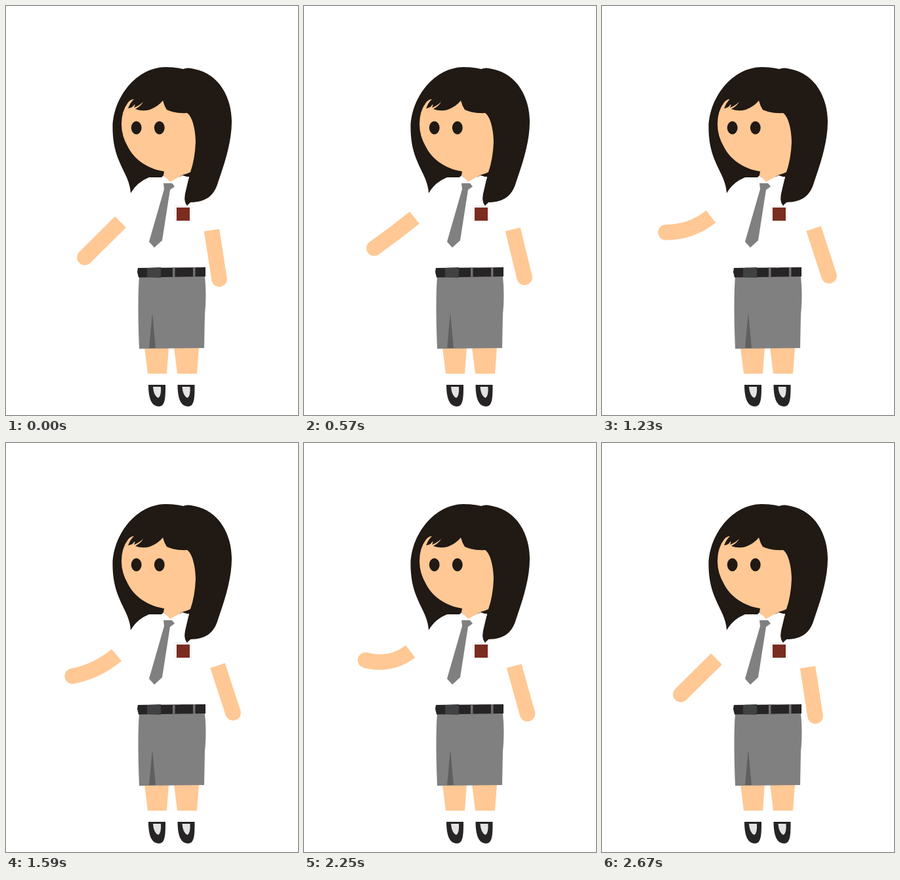
An HTML page that plays this animation: 445 by 623 pixels, repeating every 2.7 s.

```html
<!DOCTYPE html>
<html lang="en">
<head>
<meta charset="utf-8">
<title>Waving student</title>
<style>
  html, body { margin: 0; width: 100%; height: 100%; overflow: hidden; background: #fff; }
  svg { display: block; width: 445px; height: 623px; }
  .hair { fill: #201914; }
  .skin { fill: #ffc894; }
  .grey { fill: #808080; }
  .belt { fill: #272425; }
  .arm { fill: none; stroke: #ffc894; stroke-width: 23.6; }
</style>
</head>
<body>
<svg viewBox="0 0 445 623">
  <!-- head -->
  <path class="hair" d="M190 285C188 253 162 238 162.500 184C164 137 200 93.500 243 93Q259 93 270 96Q277 93 287 96C325 103 344 140 344 176C344 210 331 245 323 269C317 290 303 299 281 299L276 304Q271 297 273 286L279 260L237 261L218 261Q200 268 190 285Z"/>
  <path class="skin" d="M176 180Q176 160 186 147Q190 142 195 142Q190 146 186 156Q193 155 195 151Q198 148 195 155Q203 152 209 146Q206 152 197 157Q208 161 219 158Q232 153 239 144Q241 152 245 158Q258 164 276 163C285 169 289 192 289 207Q288 233 281 253Q275 256 270 257L250 268L240 258L241 252C215 248 195 233 186 215Q176 198 176 180Z"/>
  <g class="hair">
    <ellipse cx="198.700" cy="185.500" rx="7.900" ry="10"/>
    <ellipse cx="233.800" cy="185.500" rx="7.900" ry="10"/>
  </g>

  <!-- shirt front -->
  <path fill="#fff" d="M237 261L240 258L250 268L269 258L279 261L273 280L256 276L250 269L240 272Z"/>
  <path class="grey" d="M240 270L253 270L257 275L250 280L238 357L226 368L218 359L241 279Z"/>
  <path fill="#f7f7f9" d="M256 303H272L276 304L279 300L283 306V329H257Z"/>
  <rect x="260" y="307" width="20" height="20" fill="#7b2c20"/>
  <path class="hair" d="M273 290L281 299L276 304Q271 298 273 290Z"/>

  <!-- skirt and belt -->
  <path class="skin" d="M211 520H248L245 560H216ZM256 520H294L291 560H261Z"/>
  <path class="grey" d="M203 412H303Q306 440 303 470L302 521L203 522Q200 450 203 412Z"/>
  <path fill="#5f5f5f" d="M223 467L228 521H218Z"/>
  <path class="belt" d="M201 399L304 398V412L202 413.500L200 405Z"/>
  <path fill="#404142" d="M215 399L236 398V414L215 413Z"/>
  <path fill="#707070" d="M254 398H257.500V414H254ZM285 398H288.500V413H285Z"/>

  <!-- shoes -->
  <g id="shoe">
    <path class="belt" d="M217 577H243C243 595 243 610 233 610C221 610 217 596 217 577Z"/>
    <path fill="#e3e3e3" d="M224 580H236Q237 594 232 597Q225 594 224 580Z"/>
  </g>
  <use href="#shoe" x="44.500"/>

  <path class="arm" id="leftArm"/>
  <circle class="skin" id="leftHand" r="11.800"/>
  <path class="arm" id="rightArm"/>
  <circle class="skin" id="rightHand" r="11.800"/>
</svg>
<script>
  const LOOP = 2700, STEP = 30;
  const BEGIN = 270, END = 2670, RAISE = 570;   // when the arms leave and reach rest
  const DIP = 0.72;                             // how far the wave drops in between
  const TURN = 70 * Math.PI / 180;              // forearm turn when fully bent

  const el = id => document.getElementById(id);
  const clamp = v => Math.max(0, Math.min(1, v));
  const mix = (a, b, p) => a.map((v, i) => v + (b[i] - v) * p);

  function drawArm(side, sleeve, elbow, hand) {
    el(side + "Arm").setAttribute("d", `M${sleeve}Q${elbow} ${hand}`);
    el(side + "Hand").setAttribute("cx", hand[0]);
    el(side + "Hand").setAttribute("cy", hand[1]);
  }

  function drawLeft(lift, bend) {
    const slide = [-7 * bend * bend, -4 * bend * bend];
    const move = p => [p[0] + slide[0], p[1] + slide[1]];
    const sleeve = mix([174.5, 329], [163, 316.5], lift);
    const reach = mix([120, 383], [98, 360], lift);
    const elbow = mix(sleeve, reach, 0.5);
    const dx = reach[0] - elbow[0], dy = reach[1] - elbow[1];
    const cos = Math.cos(bend * TURN), sin = Math.sin(bend * TURN);
    const hand = [elbow[0] + dx * cos - dy * sin, elbow[1] + dx * sin + dy * cos];
    drawArm("left", move(sleeve), move(elbow), move(hand));
  }

  function drawRight(lift) {
    const sleeve = mix([313.5, 341.5], [322.5, 339], lift);
    const hand = mix([325, 416], [346, 411], lift);
    drawArm("right", sleeve, mix(sleeve, hand, 0.5), hand);
  }

  function draw(now) {
    const t = Math.floor((now % LOOP) / STEP) * STEP;
    const rise = clamp((t - BEGIN) / RAISE);
    const fall = clamp((END - t) / RAISE);
    const waved = clamp((t - BEGIN - RAISE) / (END - BEGIN - 2 * RAISE));
    const dip = DIP * (1 - Math.abs(2 * waved - 1));
    const lift = Math.min(rise, fall);
    // the elbow starts to bend halfway up
    const bend = Math.min(clamp(2 * rise - 1), fall);
    drawLeft(lift - dip, bend - dip);
    drawRight(lift);
  }

  const start = performance.now();
  function tick() {
    draw(performance.now() - start);
    requestAnimationFrame(tick);
  }
  tick();
</script>
</body>
</html>
```
